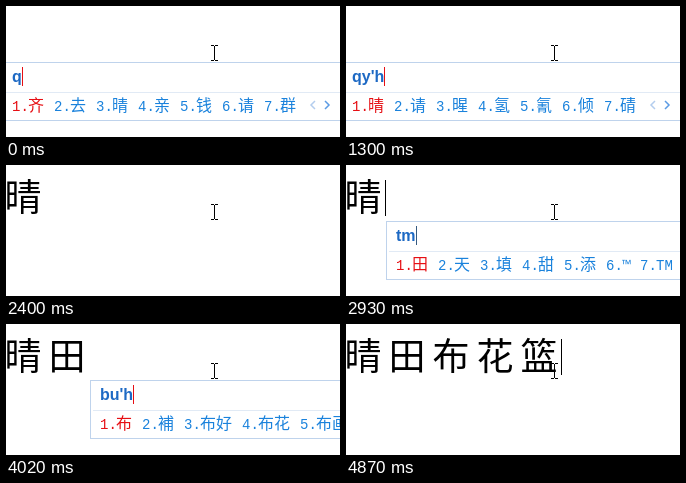
Write an HTML page with a canvas that moves like this. It is 334 by 131 pixels and loops after 5.18 s.

```html
<!DOCTYPE html>
<html lang="zh-CN">
<head>
<meta charset="utf-8">
<title>Input method demo</title>
<style>
html, body { margin: 0; width: 100%; height: 100%; overflow: hidden; background: #fff; }
canvas { display: block; }
</style>
</head>
<body>
<canvas id="stage" width="334" height="131"></canvas>
<script>
const ctx = document.getElementById('stage').getContext('2d');
const LOOP = 5180;
const RED = '#e60f14', BLUE = '#1a82dc', CODE = '#1d69c4';
const BORDER = '#bfd3ec', DIVIDER = '#e1eaf5', CARET_DARK = '#365a80';
const CELL = 44, ORIGIN = -5;
const CJK = '"Noto Sans CJK SC", "Noto Sans CJK", sans-serif';

// Each step holds until the next one begins.
const steps = [
  { at: 0, code: 'q', list: '齐 去 晴 亲 钱 请 群' },
  { at: 80, code: 'qy', list: '请 情 清 轻 青 晴 庆' },
  { at: 1300, code: "qy'h", list: '晴 请 暒 氢 氰 倾 碃' },
  { at: 1380, code: "qy'hr", list: '晴', edge: true },
  { at: 1840, text: '晴', caret: true },
  { at: 2400, text: '晴' },
  { at: 2630, text: '晴', code: 'tm', list: '田 天 填 甜 添 ™ TM', dark: true },
  { at: 2930, text: '晴', code: 'tm', list: '田 天 填 甜 添 ™ TM', dark: true, caret: true },
  { at: 3160, text: '晴田', caret: true },
  { at: 3700, text: '晴田' },
  { at: 3850, text: '晴田', code: 'bu', list: '布 不 部 步 补 捕' },
  { at: 4020, text: '晴田', code: "bu'h", list: '布 補 布好 布花 布画' },
  { at: 4250, text: '晴田', code: "bu'hw'l", list: '布花 补花 布画 部花', caret: true },
  { at: 4400, text: '晴田', code: "bu'hw'l", list: '布花篮 布花 补花 布画', caret: true, hint: true },
  { at: 4550, text: '晴田', code: "bu'hw'lj", list: '布花篮 补花篮 布花栏 布画篮', caret: true, hint: true, dark: true },
  { at: 4790, text: '晴田', caret: true },
  { at: 4870, text: '晴田布花篮', caret: true }
];

function rect(x, y, w, h, color) {
  ctx.fillStyle = color;
  ctx.fillRect(x, y, w, h);
}

function write(text, x, y, font, color) {
  ctx.font = font;
  ctx.fillStyle = color;
  ctx.fillText(text, x, y);
}

function drawDocument(text, caret) {
  ctx.textAlign = 'center';
  [...text].forEach((char, i) =>
    write(char, ORIGIN + CELL * (i + 0.5), 46, '300 37px ' + CJK, '#000'));
  ctx.textAlign = 'left';
  if (caret) rect(ORIGIN + CELL * text.length, 15, 1, 36, '#000');
}

function drawCandidates(list, x) {
  const latin = '14px "Liberation Mono", monospace';
  list.split(' ').forEach((word, i) => {
    const color = i ? BLUE : RED;
    const wide = word.charCodeAt(0) >= 0x3400;
    write(i + 1 + '.', x, 105, latin, color);
    write(word, x + 16, 105, wide ? '300 16px ' + CJK : latin, color);
    x += 26 + word.length * (wide ? 16 : 8);
  });
}

function chevron(x, dir, color) {
  ctx.strokeStyle = color;
  ctx.lineWidth = 1.5;
  ctx.beginPath();
  ctx.moveTo(x - 2 * dir, 95);
  ctx.lineTo(x + 2 * dir, 99);
  ctx.lineTo(x - 2 * dir, 103);
  ctx.stroke();
}

function drawPanel(step, left) {
  const x = left + 10;
  rect(left, 56, 400, 59, BORDER);
  rect(left + 1, 57, 399, 57, '#fff');
  rect(left + 3, 86, 397, 1, DIVIDER);
  if (step.edge) rect(333, 57, 1, 57, BORDER);

  write(step.code, x, 76, 'bold 16px "Liberation Sans", Arial, sans-serif', CODE);
  const end = Math.round(x + ctx.measureText(step.code).width);
  rect(end, 61, 1, 19, step.dark ? CARET_DARK : RED);

  drawCandidates(step.list, x);
  if (step.hint) write('按分号(;)显示更多人名', 227, 75, '300 12px ' + CJK, BLUE);
  if (left < 0) {
    chevron(307, -1, '#b3cdee');
    chevron(321, 1, step.edge ? '#b3cdee' : '#5b9be4');
  }
}

function drawPointer() {
  rect(208, 40, 1, 14, '#000');
  for (const y of [39, 54]) {
    rect(205, y, 3, 1, '#000');
    rect(209, y, 3, 1, '#000');
  }
}

function draw(now) {
  const time = now % LOOP;
  const step = steps.findLast(s => s.at <= time);
  const text = step.text || '';
  rect(0, 0, 334, 131, '#fff');
  drawDocument(text, step.caret);
  if (step.code) drawPanel(step, ORIGIN + 1 + CELL * text.length);
  drawPointer();
}

function tick() {
  draw(performance.now());
  requestAnimationFrame(tick);
}
tick();
</script>
</body>
</html>
```
